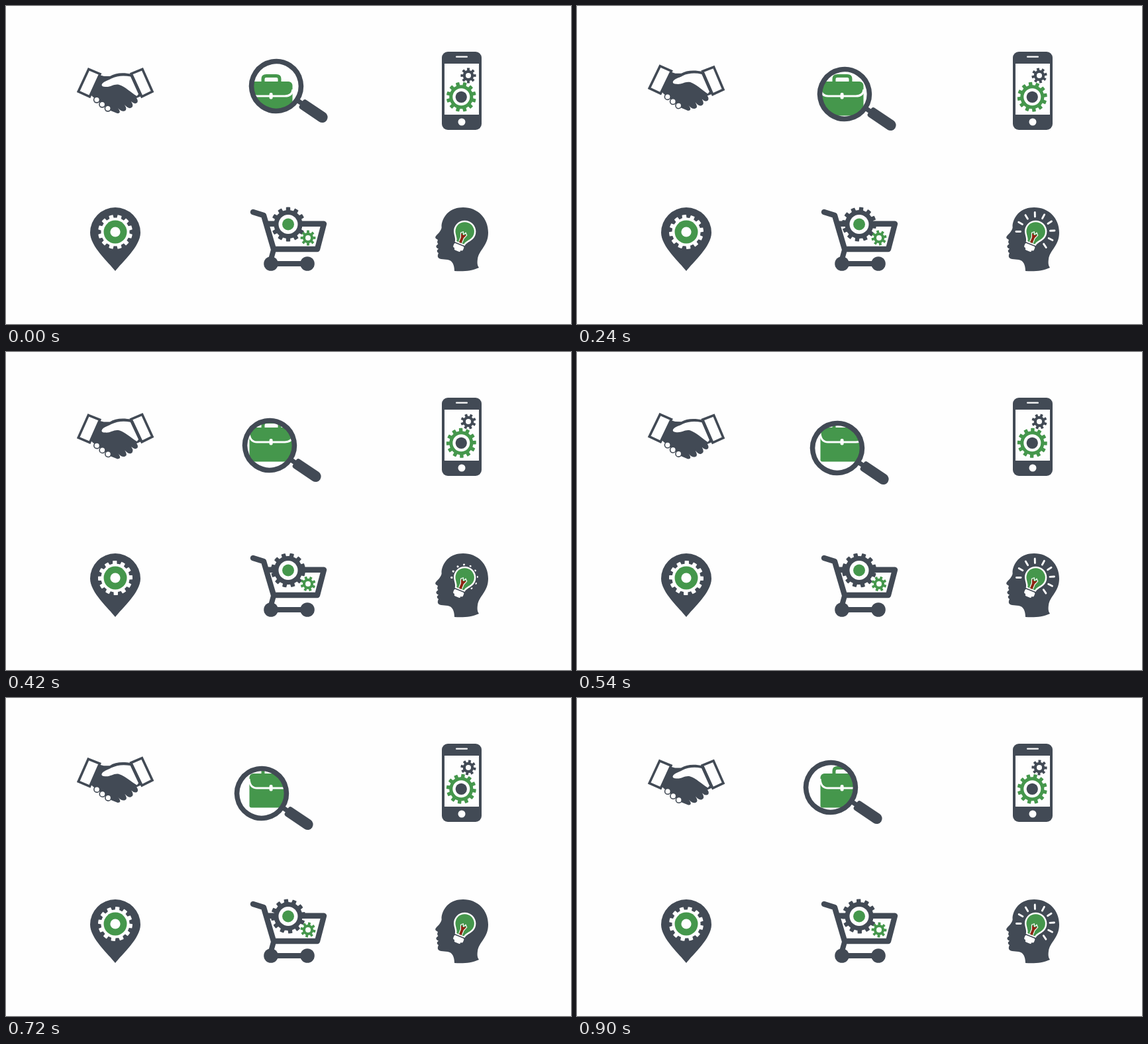
Write an HTML page with a canvas that moves like this. It is 853 px wide and 480 px high and loops after 960 ms.

```html
<!DOCTYPE html>
<html lang="en">
<head>
<meta charset="utf-8">
<title>Business icons</title>
<style>
html, body { margin: 0; width: 100%; height: 100%; overflow: hidden; background: #fefefe; }
canvas { display: block; }
</style>
</head>
<body>
<canvas id="stage" width="853" height="480"></canvas>
<script>
const ctx = document.getElementById('stage').getContext('2d');
const LOOP = 960, STEP = 60, TAU = Math.PI * 2;
const DARK = '#424a55', GREEN = '#45974c', WHITE = '#fefefe', RED = '#8f2413';

const rad = deg => deg * Math.PI / 180;

function fill(path, color) {
  ctx.fillStyle = color;
  ctx.fill(new Path2D(path));
}

function line(path, color, width, cap = 'round') {
  ctx.strokeStyle = color;
  ctx.lineWidth = width;
  ctx.lineCap = cap;
  ctx.lineJoin = cap === 'round' ? 'round' : 'miter';
  ctx.stroke(new Path2D(path));
}

function disc(x, y, r, color) {
  ctx.fillStyle = color;
  ctx.beginPath();
  ctx.arc(x, y, r, 0, TAU);
  ctx.fill();
}

function box(x, y, w, h, r, color) {
  ctx.fillStyle = color;
  ctx.beginPath();
  ctx.roundRect(x, y, w, h, r);
  ctx.fill();
}

function placed(x, y, angle, draw) {
  ctx.save();
  ctx.translate(x, y);
  ctx.rotate(angle);
  draw();
  ctx.restore();
}

// The turn and offset are counted in teeth; offset 0 puts a tooth at the top.
function gear(x, y, outer, root, teeth, turn, color) {
  const pitch = TAU / teeth;
  ctx.fillStyle = color;
  ctx.beginPath();
  for (let i = 0; i < teeth; i++) {
    const a = (i + turn) * pitch - TAU / 4;
    ctx.arc(x, y, root, a - pitch / 2, a - pitch * 0.29);
    ctx.arc(x, y, outer, a - pitch * 0.23, a + pitch * 0.23);
    ctx.arc(x, y, root, a + pitch * 0.29, a + pitch / 2);
  }
  ctx.fill();
}

// Smooth curve through [time, value] keys.
function track(keys, t) {
  const slope = i => {
    const a = keys[Math.max(i - 1, 0)], b = keys[Math.min(i + 1, keys.length - 1)];
    return (b[1] - a[1]) / (b[0] - a[0]);
  };
  let i = 0;
  while (i < keys.length - 2 && t > keys[i + 1][0]) i++;
  const [t0, v0] = keys[i], [t1, v1] = keys[i + 1];
  const d = t1 - t0, u = (t - t0) / d, w = 1 - u;
  return v0 * (1 + 2 * u) * w * w + slope(i) * d * u * w * w
       + v1 * u * u * (3 - 2 * u) - slope(i + 1) * d * u * u * w;
}

const LENS_X = [[0, 408], [120, 407], [240, 404], [420, 398], [540, 393], [720, 386], [900, 383]];
const LENS_Y = [[0, 121], [120, 127], [240, 133], [420, 141], [540, 145], [720, 144], [900, 135]];
const SHAKE_TILT = [[0, 0], [120, 1.6], [240, 1], [420, -0.7], [540, 1], [720, -1], [900, 0]];

function handshake(t) {
  const lift = -2 * (1 - Math.cos(TAU * t / 480));
  placed(165, 128 + lift, rad(track(SHAKE_TILT, t)), () => {
    ctx.translate(-165, -128);
    fill('M141 104 L148 106 L157 106 C165 101 177 100 190 103 L204 136 L197 139 Q200 143 198 146 '
       + 'Q194 149 189 144 Q194 152 188 154 Q184 155 179 149 Q184 157 179 158.5 Q174 160 169 154 '
       + 'Q175 162 168 162 L158 158 L131 137 L128 134 Z', DARK);
    fill('M144.5 119 C146 114 153 113 159 109.5 C168 105 178 104.5 188 106.5 L200 133 L197.5 136 '
       + 'C188 130 180 122 171 119 C163 117 158 123 150 122 Q144.5 122 144.5 119 Z', WHITE);
    for (const [x, y] of [[137, 141.5], [145.3, 148.5], [153.8, 154.5]]) {
      disc(x, y, 5.2, DARK);
      disc(x, y, 3.6, WHITE);
    }
    for (const cuff of ['M124.8 95.4 L142 102.6 L126.3 136.8 L109.2 129.2 Z',
                        'M206 95.4 L221 129.2 L205 136.8 L189.2 102.2 Z']) {
      fill(cuff, WHITE);
      line(cuff, DARK, 3.6, 'butt');
    }
  });
}

function briefcase() {
  line('M388 116 V110 Q388 105.5 393 105.5 H408 Q413 105.5 413 110 V116', GREEN, 5, 'butt');
  box(367.5, 114, 65, 51.5, [6, 6, 3, 3], GREEN);
  line('M367 122 Q368 136 379 136 H421 Q432 136 433 126', WHITE, 3, 'butt');
  box(397.6, 131, 5, 9.5, 2, WHITE);
}

function magnifier(t) {
  const x = track(LENS_X, t), y = track(LENS_Y, t);
  ctx.save();
  ctx.beginPath();
  ctx.arc(x, y, 35, 0, TAU);
  ctx.clip();
  briefcase();
  ctx.restore();
  placed(x, y, rad(34), () => {
    ctx.strokeStyle = DARK;
    ctx.lineWidth = 7.6;
    ctx.beginPath();
    ctx.arc(0, 0, 37.4, 0, TAU);
    ctx.stroke();
    box(38, -3.5, 12, 7, 0, DARK);
    box(45.5, -8.2, 46.5, 16.4, [4, 8.2, 8.2, 4], DARK);
  });
}

function phone(turn) {
  box(658, 69, 60, 118, 9, DARK);
  box(679, 75.5, 18, 2.2, 1, WHITE);
  box(662, 87, 52, 77, 0, WHITE);
  gear(698, 105, 11.6, 8.2, 8, -turn, DARK);
  disc(698, 105, 4, WHITE);
  disc(688, 175, 5.5, WHITE);
  gear(687.3, 137.3, 22.5, 18, 12, turn + 0.5, GREEN);
  disc(687.3, 137.3, 13, WHITE);
  disc(687.3, 137.3, 8.6, DARK);
}

function pin(turn) {
  fill('M165 400 C155 387 127 363 127 342 A38 38 0 0 1 203 342 C203 363 175 387 165 400 Z', DARK);
  gear(165, 341, 26, 21.5, 12, turn + 0.5, WHITE);
  disc(165, 341, 17.5, GREEN);
  disc(165, 341, 7.6, WHITE);
}

function cart(turn) {
  line('M373 311 L389 316 L404 367 H470 L480 328.8 H394', DARK, 8.4);
  line('M404 368 L399 386', DARK, 8);
  line('M400 389 H455', DARK, 8.2);
  disc(400, 389, 10.8, DARK);
  disc(455, 389, 10.8, DARK);
  gear(426, 329.5, 26, 21.5, 12, turn, DARK);
  disc(426, 329.5, 14.5, WHITE);
  disc(426, 329.5, 9, GREEN);
  gear(456, 350, 11.4, 8, 8, -turn, GREEN);
  disc(456, 350, 4, WHITE);
}

function rays(t) {
  const reach = Math.min(29, 15 + (t % 360) / 60 * 4.5);
  for (let i = 0; i < 9; i++) {
    const a = rad(180 + i * 29.5), c = Math.cos(a), s = Math.sin(a);
    const inner = reach - 6.5;
    line(`M${692 + c * inner} ${340.5 + s * inner} L${692 + c * reach} ${340.5 + s * reach}`, WHITE, 2.9);
  }
}

function bulb() {
  disc(0, 0, 18.4, DARK);
  fill('M-16.8 0 A16.8 16.8 0 0 1 16.8 0 C16.8 9 8.5 13 8 20 H-8 C-8.5 13 -16.8 9 -16.8 0 Z', WHITE);
  fill('M-14.3 0 A14.3 14.3 0 0 1 14.3 0 C14.3 8 6.5 12 6 18 H-6 C-6.5 12 -14.3 8 -14.3 0 Z', GREEN);
  fill('M-5 4 L0 6 L5 4 L2 10 V18 H-2 V10 Z', RED);
  line('M-2.6 17 V10 L-5 4 L-2 1 L0 5 L2 1 L5 4 L2.6 10 V17', WHITE, 1.1);
  box(-8, 21.5, 16, 7, 2, WHITE);
  box(-5, 27, 10, 4.5, 2, WHITE);
}

function head(t) {
  fill('M690 304 C712 304 728 320 728 342 C728 362 714 368 712 382 C711 389 712 392 714 395 '
     + 'C703 400 690 401 677 400 C677 391 674 384 667 383 L657 382 C651 381 651 377 653 373 '
     + 'Q650 371 651 368.5 L653 366.5 Q649 365 649.5 362 L652.5 359 Q650 357 652 353 '
     + 'L649 351 Q647 349 650 346 Q659 338 657.5 331 C660 315 672 304 690 304 Z', DARK);
  rays(t);
  placed(692.6, 340.5, rad(22), bulb);
}

function render(now) {
  const t = Math.floor(now % LOOP / STEP) * STEP;
  const turn = t / LOOP;
  ctx.fillStyle = WHITE;
  ctx.fillRect(0, 0, 853, 480);
  handshake(t);
  magnifier(t);
  phone(turn);
  pin(turn);
  cart(turn);
  head(t);
}

let start;
function tick(now) {
  start ??= now;
  render(Math.max(0, now - start));
  requestAnimationFrame(tick);
}
render(0);
requestAnimationFrame(tick);
</script>
</body>
</html>
```
